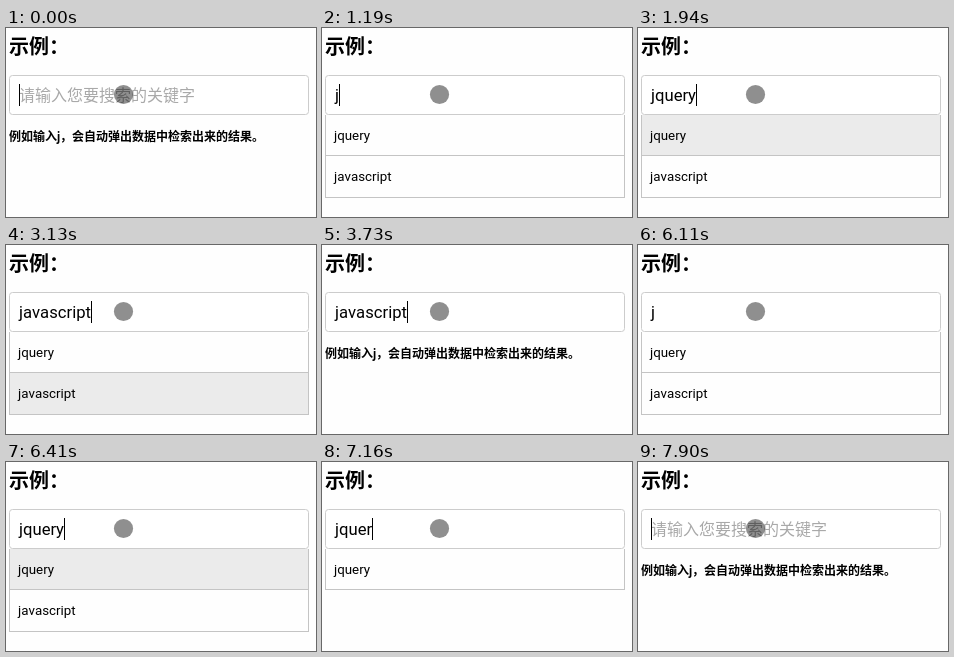
These frames come from a looping animation (310 px wide and 189 px high, 8000 ms). An HTML page with a canvas:

```html
<!DOCTYPE html>
<html lang="zh-CN">
<head>
<meta charset="utf-8">
<title>示例</title>
<style>
  html, body { margin: 0; width: 100%; height: 100%; overflow: hidden; background: #fefefe; }
  canvas { display: block; width: 310px; height: 189px; }
</style>
</head>
<body>
<canvas id="stage"></canvas>
<script>
const W = 310, H = 189, LOOP = 8000;
const FONT = 'Roboto, "Noto Sans CJK SC", "Noto Sans CJK", sans-serif';
const WORDS = ['jquery', 'javascript'];
const LEFT = 13;

const canvas = document.getElementById('stage');
const ctx = canvas.getContext('2d');
const dpr = window.devicePixelRatio || 1;
canvas.width = W * dpr;
canvas.height = H * dpr;
ctx.scale(dpr, dpr);

// Each step: start time, field value, query that filters the list, selected row, caret
const steps = [];
const step = (at, value, query = '', selected = -1, caret = true) =>
  steps.push({ at, value, query, selected, caret });

// Backspace repeats every 148 ms
function erase(at, word, downTo) {
  for (let n = word.length - 1; n >= downTo; n--) {
    const rest = word.slice(0, n);
    step(at, rest, rest);
    at += 148;
  }
}

step(0, '');
step(450, 'j', 'j');
step(900, 'j', 'j', -1, false);
step(1190, 'j', 'j');
step(1640, 'j', 'j', -1, false);
step(1940, 'jquery', 'j', 0);
step(2240, 'javascript', 'j', 1);
step(2680, 'javascript', 'j', 1, false);
step(3130, 'javascript', 'j', 1);
step(3730, 'javascript');
erase(4180, 'javascript', 2);
step(5660, 'j', 'j');
step(6110, 'j', 'j', -1, false);
step(6410, 'jquery', 'j', 0);
step(6710, 'jquery');
erase(7160, 'jquery', 0);

function text(str, x, y, size, color = '#000', weight = 400) {
  ctx.font = `${weight} ${size}px ${FONT}`;
  ctx.fontKerning = 'none';
  ctx.fillStyle = color;
  ctx.fillText(str, x, y);
}

function rect(x, y, w, h, color) {
  ctx.fillStyle = color;
  ctx.fillRect(x, y, w, h);
}

function drawField({ value, caret }) {
  ctx.beginPath();
  ctx.roundRect(3.5, 47.5, 299, 39, 3);
  ctx.fillStyle = '#fff';
  ctx.fill();
  ctx.lineWidth = 1;
  ctx.strokeStyle = '#ccc';
  ctx.stroke();
  if (value) text(value, LEFT, 73, 16.67);
  else text('请输入您要搜索的关键字', LEFT, 73, 16, '#a9a9a9');
  if (caret) {
    const width = value ? Math.round(ctx.measureText(value).width) : 0;
    rect(LEFT + width, 56, 1, 22, '#000');
  }
}

function drawList({ query, selected }) {
  const rows = WORDS.filter(w => w.startsWith(query));
  rows.forEach((word, i) => {
    const top = i ? 128 : 87, height = i ? 42 : 41;
    rect(3, top, 300, height, '#c4c4c4');
    rect(4, top, 298, height - 1, i === selected ? '#ebebeb' : '#fefefe');
    text(word, 12, i ? 153 : 112, 13.33);
  });
}

function draw(t) {
  const now = steps.findLast(s => s.at <= t);
  rect(0, 0, W, H, '#fefefe');
  text('示例：', 3, 25.5, 20, '#000', 700);
  drawField(now);
  if (now.query) drawList(now);
  else text('例如输入j，会自动弹出数据中检索出来的结果。', 3, 112.5, 12, '#000', 700);
  ctx.beginPath();
  ctx.arc(117.5, 66.5, 9.6, 0, Math.PI * 2);
  ctx.fillStyle = 'rgba(0, 0, 0, 0.44)';
  ctx.fill();
}

const start = performance.now();
function tick() {
  draw((performance.now() - start) % LOOP);
  requestAnimationFrame(tick);
}
tick();
</script>
</body>
</html>
```
